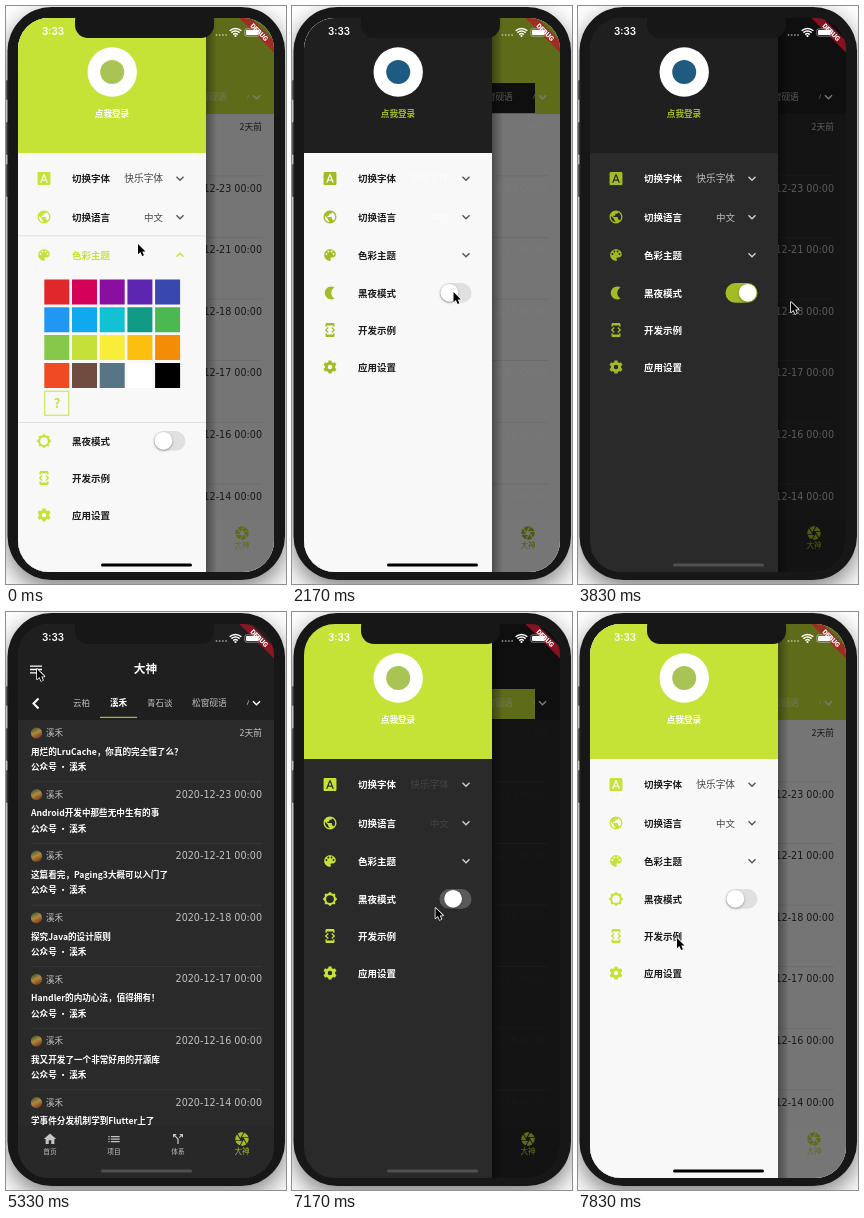
These frames come from a looping animation (280 px wide and 578 px high, 7.99 s). An HTML page with a canvas:

```html
<!DOCTYPE html>
<html lang="zh-CN">
<head>
<meta charset="utf-8">
<title>Drawer theme demo</title>
<style>
html, body { margin: 0; width: 100%; height: 100%; overflow: hidden; background: #fff; }
canvas { display: block; width: 280px; height: 578px; }
</style>
</head>
<body>
<canvas id="stage"></canvas>
<script>
const canvas = document.getElementById('stage');
const ctx = canvas.getContext('2d');
const ratio = window.devicePixelRatio || 1;
canvas.width = 280 * ratio;
canvas.height = 578 * ratio;

const LOOP = 7990, STEPS_PER_MS = 0.006;
const LIME = '#c5e336', OLIVE = '#a3bb24';
const FONT = '"Noto Sans CJK SC", "Noto Sans CJK", sans-serif';
const SCREEN = [12, 12, 256, 554];

const ICONS = {
  menu: 'M3 18h18v-2H3zM3 13h18v-2H3zM3 6v2h18V6z',
  down: 'M7.41 8.59L12 13.17l4.59-4.58L18 10l-6 6-6-6z',
  home: 'M10 20v-6h4v6h5v-8h3L12 3 2 12h3v8z',
  list: 'M3 13h2v-2H3zM3 17h2v-2H3zM3 9h2V7H3zM7 13h14v-2H7zM7 17h14v-2H7zM7 7v2h14V7z',
  split: 'M14 4l2.29 2.29-2.88 2.88 1.42 1.42 2.88-2.88L20 10V4zM10 4H4v6l2.29-2.29 4.71 4.7V20h2v-8.41l-5.29-5.3z',
  shutter: 'M9.4 10.5l4.77-8.26C13.47 2.09 12.75 2 12 2c-2.4 0-4.6.85-6.32 2.25l3.66 6.35zM21.54 9c-.92-2.92-3.15-5.26-6-6.34L11.88 9zM21.8 10h-7.49l.29.5 4.76 8.25C21 16.97 22 14.61 22 12c0-.69-.07-1.35-.2-2zM8.54 12l-3.9-6.75C3.01 7.03 2 9.39 2 12c0 .69.07 1.35.2 2h7.49zM2.46 15c.92 2.92 3.15 5.26 6 6.34L12.12 15zM13.73 15l-3.9 6.76c.7.15 1.42.24 2.17.24 2.4 0 4.6-.85 6.32-2.25l-3.66-6.35z',
  font: 'M9.93 13.5h4.14L12 7.98zM20 2H4c-1.1 0-2 .9-2 2v16c0 1.1.9 2 2 2h16c1.1 0 2-.9 2-2V4c0-1.1-.9-2-2-2zM15.95 18.5l-1.14-3H9.17l-1.12 3H5.96l5.11-13h1.86l5.11 13z',
  globe: 'M12 2C6.48 2 2 6.48 2 12s4.48 10 10 10 10-4.48 10-10S17.52 2 12 2zM11 19.93c-3.95-.49-7-3.85-7-7.93 0-.62.08-1.21.21-1.79L9 15v1c0 1.1.9 2 2 2zM17.9 17.39c-.26-.81-1-1.39-1.9-1.39h-1v-3c0-.55-.45-1-1-1H8v-2h2c.55 0 1-.45 1-1V7h2c1.1 0 2-.9 2-2v-.41c2.93 1.19 5 4.06 5 7.41 0 2.08-.8 3.97-2.1 5.39z',
  palette: 'M12 3c-4.97 0-9 4.03-9 9s4.03 9 9 9c.83 0 1.5-.67 1.5-1.5 0-.39-.15-.74-.39-1.01-.23-.26-.38-.61-.38-.99 0-.83.67-1.5 1.5-1.5H16c2.76 0 5-2.24 5-5 0-4.42-4.03-8-9-8zM6.5 12a1.5 1.5 0 1 1 0-3a1.5 1.5 0 0 1 0 3zM9.5 8a1.5 1.5 0 1 1 0-3a1.5 1.5 0 0 1 0 3zM14.5 8a1.5 1.5 0 1 1 0-3a1.5 1.5 0 0 1 0 3zM17.5 12a1.5 1.5 0 1 1 0-3a1.5 1.5 0 0 1 0 3z',
  sun: 'M20 15.31L23.31 12 20 8.69V4h-4.69L12 .69 8.69 4H4v4.69L.69 12 4 15.31V20h4.69L12 23.31 15.31 20H20zM12 18a6 6 0 1 1 0-12a6 6 0 0 1 0 12z',
  moon: 'M14 2c1.82 0 3.53.5 5 1.35C16.01 5.08 14 8.3 14 12s2.01 6.92 5 8.65C17.53 21.5 15.82 22 14 22 8.48 22 4 17.52 4 12S8.48 2 14 2z',
  code: 'M7 5h10v2h2V3c0-1.1-.9-2-2-2H7c-1.1 0-2 .9-2 2v4h2zM15.41 16.59L20 12l-4.59-4.59L14 8.83 17.17 12 14 15.17zM10 15.17L6.83 12 10 8.83 8.59 7.41 4 12l4.59 4.59zM17 19H7v-2H5v4c0 1.1.9 2 2 2h10c1.1 0 2-.9 2-2v-4h-2z'
};
for (const name in ICONS) ICONS[name] = new Path2D(ICONS[name]);

const AUTHOR = '溪禾';
const POSTS = [
  ['用烂的LruCache，你真的完全懂了么？', '2天前'],
  ['Android开发中那些无中生有的事', '23'],
  ['这篇看完，Paging3大概可以入门了', '21'],
  ['探究Java的设计原则', '18'],
  ['Handler的内功心法，值得拥有！', '17'],
  ['我又开发了一个非常好用的开源库', '16'],
  ['学事件分发机制学到Flutter上了', '14']
];
const SWATCHES = [
  '#e1272b', '#d4005a', '#8a0fa0', '#5e25b0', '#3947b0',
  '#2196f3', '#10a9f0', '#12c2d4', '#119a86', '#4bb851',
  '#86c84a', '#c5e038', '#f8ee3a', '#fbbf10', '#f58c06',
  '#f04a22', '#6f4b40', '#587585', '#ffffff', '#000000'
];

// Keys are [step, value...]; values between keys are interpolated.
const CURSOR = [[3, 132, 238], [9, 161, 286], [17, 162, 286], [23, 213, 296], [25, 210, 292],
  [31, 31, 59], [32, 31, 57], [33, 32, 58], [38, 136, 300], [40, 161, 284], [42, 161, 285],
  [44, 126, 307], [47, 99, 326]];
const EXPAND = [[2, 1], [4, 0]];
const OPEN = [[23, 1], [24, .5], [25, 0], [32, 0], [33, .45], [34, 1]];
const DARK = [[13, 0], [14, .8], [15, 1], [43, 1], [44, .24], [45, 0]];
const LABEL = [[13, 0], [14, .4], [15, 1], [44, 1], [45, .2], [46, 0]];
const SWITCH = [[13, 0], [14, .8], [15, 1], [42, 1], [43, .3], [44, 0]];

function track(keys, step) {
  const next = keys.findIndex(key => key[0] >= step);
  if (next < 0) return keys[keys.length - 1].slice(1);
  if (next === 0) return keys[0].slice(1);
  const a = keys[next - 1], b = keys[next], t = (step - a[0]) / (b[0] - a[0]);
  return a.slice(1).map((v, i) => v + (b[i + 1] - v) * t);
}

function mix(a, b, t) {
  const part = (hex, i) => parseInt(hex.substr(1 + 2 * i, 2), 16);
  return `rgb(${[0, 1, 2].map(i => Math.round(part(a, i) + (part(b, i) - part(a, i)) * t))})`;
}

function box(color, x, y, w, h, r = 0) {
  ctx.fillStyle = color;
  ctx.beginPath();
  ctx.roundRect(x, y, w, h, r);
  ctx.fill();
}

function disc(color, x, y, r) {
  ctx.fillStyle = color;
  ctx.beginPath();
  ctx.arc(x, y, r, 0, 7);
  ctx.fill();
}

function text(s, x, y, size, color, weight = 400, align = 'left', font = FONT) {
  ctx.font = `${weight} ${size}px ${font}`;
  ctx.textAlign = align;
  ctx.textBaseline = 'middle';
  ctx.fillStyle = color;
  ctx.fillText(s, x, y);
}

function icon(name, x, y, size, color, flip = 1) {
  ctx.save();
  ctx.translate(x, y);
  ctx.scale(size / 24, size / 24 * flip);
  ctx.translate(-12, -12);
  ctx.fillStyle = color;
  ctx.fill(ICONS[name], 'evenodd');
  ctx.restore();
}

function gear(x, y, color) {
  ctx.strokeStyle = color;
  ctx.lineWidth = 3;
  ctx.beginPath();
  ctx.arc(x, y, 3.7, 0, 7);
  ctx.stroke();
  ctx.lineWidth = 3.2;
  for (let i = 0; i < 6; i++) {
    const c = Math.cos(i * Math.PI / 3 + Math.PI / 6), s = Math.sin(i * Math.PI / 3 + Math.PI / 6);
    ctx.beginPath();
    ctx.moveTo(x + 4 * c, y + 4 * s);
    ctx.lineTo(x + 6.6 * c, y + 6.6 * s);
    ctx.stroke();
  }
}

function clipped(rect, radius, paint) {
  ctx.save();
  ctx.beginPath();
  ctx.roundRect(...rect, radius);
  ctx.clip();
  paint();
  ctx.restore();
}

function shadowed(color, blur, offset, paint) {
  ctx.save();
  ctx.shadowColor = color;
  ctx.shadowBlur = blur * ratio;
  ctx.shadowOffsetY = offset * ratio;
  paint();
  ctx.restore();
}

function drawPost([title, date], y, night) {
  const strong = night ? '#fff' : '#222', soft = night ? 'rgba(255,255,255,.7)' : '#333';
  const face = ctx.createLinearGradient(28, y - 5, 33, y + 5);
  face.addColorStop(0, '#4a5a34');
  face.addColorStop(.45, '#b08a3c');
  face.addColorStop(1, '#7a3a24');
  disc(face, 30.5, y, 5.6);
  text(AUTHOR, 40, y, 8.6, soft, 500);
  if (date.length > 2) text(date, 256, y, 8.8, soft, 400, 'right');
  else text(`2020-12-${date} 00:00`, 256, y + .5, 9.6, soft, 400, 'right', '"DejaVu Sans", sans-serif');
  text(title, 25, y + 18.5, 8.6, strong, 700);
  text(`公众号 · ${AUTHOR}`, 25, y + 34, 8.6, strong, 700);
}

function drawPage(s) {
  const bar = mix(LIME, '#1f1f1f', s.dark), line = mix('#dcdcdc', '#3a3a3a', s.dark);
  box(mix('#f5f5f5', '#2a2a2a', s.dark), ...SCREEN);
  POSTS.forEach((post, i) => {
    const y = 121 + 61.6 * i;
    drawPost(post, y, s.night);
    box(line, 25, y + 48.5, 231, .7);
  });

  box(bar, 12, 12, 256, 96);
  box(s.night ? '#1f1f1f' : LIME, 41, 77, 202, 30);
  icon('menu', 30, 57.5, 16, '#fff');
  text('大神', 139.5, 57, 11.7, '#fff', 700, 'center');
  ctx.strokeStyle = '#fff';
  ctx.lineWidth = 2;
  ctx.beginPath();
  ctx.moveTo(32.5, 86.5);
  ctx.lineTo(27.5, 91.5);
  ctx.lineTo(32.5, 96.5);
  ctx.stroke();
  const tab = 'rgba(255,255,255,.72)';
  text('云柏', 67, 91, 8.5, tab);
  text(AUTHOR, 104, 91, 8.6, '#fff', 700);
  text('青石谈', 141, 91, 8.5, tab);
  text('松窗砚语', 186, 91, 8.7, tab);
  clipped([236, 77, 7, 30], 0, () => text('小', 240.5, 91, 8.6, tab));
  icon('down', 250.5, 91, 16, '#fff');
  box(s.night ? OLIVE : '#fff', 94, 104.8, 37, 1.3);

  box(mix('#f8f8f8', '#282828', s.dark), 12, 514, 256, 52);
  const idle = s.night ? '#c4c4c4' : '#666';
  [['home', '首页'], ['list', '项目'], ['split', '体系']].forEach(([name, label], i) => {
    icon(name, 44 + 64 * i, 527, 15, idle);
    text(label, 44 + 64 * i, 539.5, 6.7, idle, 500, 'center');
  });
  icon('shutter', 236, 527, 16, s.accent);
  text('大神', 236, 539, 7.6, s.accent, 500, 'center');
}

function drawPalette(e) {
  clipped([12, 268, 188, 148 * e], 0, () => {
    ctx.translate(0, -74 * (1 - e));
    SWATCHES.forEach((color, i) => box(color, 38.3 + 27.7 * (i % 5), 273.5 + 27.8 * Math.floor(i / 5), 25, 25));
    ctx.strokeStyle = LIME;
    ctx.lineWidth = 1;
    ctx.strokeRect(38.8, 385.2, 24, 24);
    text('?', 51, 397.5, 13, LIME, 700, 'center');
  });
}

function drawSwitch(y, s) {
  const off = mix('#e0e0e0', '#5a5a5a', s.dark);
  box(s.sw > .5 ? s.accent : off, 147.5, y - 10, 32, 19.8, 9.9);
  shadowed('rgba(0,0,0,.35)', 2.5, 1, () => disc('#fff', 157.4 + 12.3 * s.sw, y - .2, 8.9));
}

function drawDrawer(s) {
  ctx.save();
  ctx.translate(-200 * (1 - s.open), 0);
  const shade = ctx.createLinearGradient(200, 0, 211, 0);
  shade.addColorStop(0, 'rgba(0,0,0,.35)');
  shade.addColorStop(1, 'rgba(0,0,0,0)');
  box(shade, 200, 12, 11, 554);
  box(mix('#f8f8f8', '#2a2a2a', s.dark), 12, 12, 188, 554);
  box(s.night ? '#1f1f1f' : LIME, 12, 12, 188, 135);
  disc('#fff', 106.2, 66, 24.7);
  disc(s.night ? '#1f5a80' : '#a8c455', 106.2, 66, 12);
  text('点我登录', 106, 107.5, 8.6, s.night ? OLIVE : '#fff', 700, 'center');

  const ink = mix('#1c1c1c', '#ffffff', s.label), arrow = mix('#555555', '#d0d0d0', s.dark);
  const trailing = s.night ? 'rgba(255,255,255,.7)' : '#444';
  const shift = 148 * s.expand;
  const row = (name, label, y, color = ink) => {
    if (name === 'gear') gear(38, y, s.accent);
    else icon(name, 38, y, 15.5, s.accent);
    text(label, 66, y, 9.5, color, 700);
  };
  row('font', '切换字体', 172.5);
  text('快乐字体', 157, 172.5, 9.7, trailing, 400, 'right');
  icon('down', 174, 172.5, 16, arrow);
  row('globe', '切换语言', 211);
  text('中文', 157, 211, 9.5, trailing, 400, 'right');
  icon('down', 174, 211, 16, arrow);
  row('palette', '色彩主题', 249, s.expand > .5 ? LIME : ink);
  icon('down', 174, 249, 16, s.expand > .5 ? LIME : arrow, s.expand > .5 ? -1 : 1);
  if (s.expand > 0) {
    const line = `rgba(0,0,0,${.13 * s.expand})`;
    box(line, 12, 229.5, 188, .8);
    drawPalette(s.expand);
    box(line, 12, 268 + shift, 188, .8);
  }
  row(s.night ? 'moon' : 'sun', '黑夜模式', 287 + shift);
  drawSwitch(287 + shift, s);
  row('code', '开发示例', 324 + shift);
  row('gear', '应用设置', 361 + shift);
  ctx.restore();
}

function drawBanner() {
  ctx.save();
  ctx.translate(253.4, 26.2);
  ctx.rotate(Math.PI / 4);
  box('rgba(183,20,40,.7)', -40, -4.1, 80, 8.2);
  text('DEBUG', 0, .4, 6.8, '#fff', 900, 'center', 'Roboto, sans-serif');
  ctx.restore();
}

function drawStatus() {
  text('3:33', 47, 26.5, 9.9, '#fff', 600, 'center', 'Inter, sans-serif');
  for (let i = 0; i < 4; i++) disc('rgba(255,255,255,.5)', 210.5 + 3.2 * i, 29, .9);
  ctx.strokeStyle = '#fff';
  ctx.lineWidth = 1.5;
  for (const r of [3.3, 6, 8.5]) {
    ctx.beginPath();
    ctx.arc(229.5, 31, r, -Math.PI * .74, -Math.PI * .26);
    ctx.stroke();
  }
  disc('#fff', 229.5, 30, 1.1);
  ctx.lineWidth = .7;
  ctx.strokeStyle = 'rgba(255,255,255,.6)';
  ctx.beginPath();
  ctx.roundRect(238.8, 22.8, 15, 7.4, 2);
  ctx.stroke();
  box('#fff', 240, 24, 12.6, 5, 1.1);
}

function drawCursor([x, y]) {
  ctx.save();
  ctx.translate(x, y);
  ctx.scale(.85, .85);
  ctx.beginPath();
  [[0, 0], [0, 12], [2.8, 9.4], [4.9, 14], [7, 13.1], [5, 8.7], [8.8, 8.7]].forEach(p => ctx.lineTo(...p));
  ctx.closePath();
  ctx.lineJoin = 'round';
  ctx.strokeStyle = '#fff';
  ctx.lineWidth = 1.8;
  ctx.stroke();
  ctx.fillStyle = '#000';
  ctx.fill();
  ctx.restore();
}

function draw(step) {
  const night = step >= 13 && step < 43;
  const value = keys => track(keys, step)[0];
  const s = {
    night, accent: night ? OLIVE : LIME, dark: value(DARK), label: value(LABEL),
    sw: value(SWITCH), open: value(OPEN), expand: value(EXPAND)
  };
  ctx.setTransform(ratio, 0, 0, ratio, 0, 0);
  box('#fff', 0, 0, 280, 578);
  shadowed('rgba(0,0,0,.5)', 24, 9, () => box('#171717', 1.5, 1, 277.5, 573, 44));
  for (const [y, h] of [[74, 20], [116, 33], [158, 33]]) box('#333', .3, y, 2, h, 1);
  clipped(SCREEN, 31, () => {
    drawPage(s);
    box(`rgba(0,0,0,${.52 * s.open})`, ...SCREEN);
    if (s.open > 0) drawDrawer(s);
    drawBanner();
    drawStatus();
    box('#171717', 69, 2, 139, 30, 13);
    box(mix('#000000', '#505050', s.dark), 95, 557.5, 91, 3, 1.5);
  });
  drawCursor(track(CURSOR, step));
}

function tick() {
  const time = performance.now() % LOOP;
  draw(Math.min(47, Math.floor((time + 3.4) * STEPS_PER_MS)));
  requestAnimationFrame(tick);
}
tick();
</script>
</body>
</html>
```
